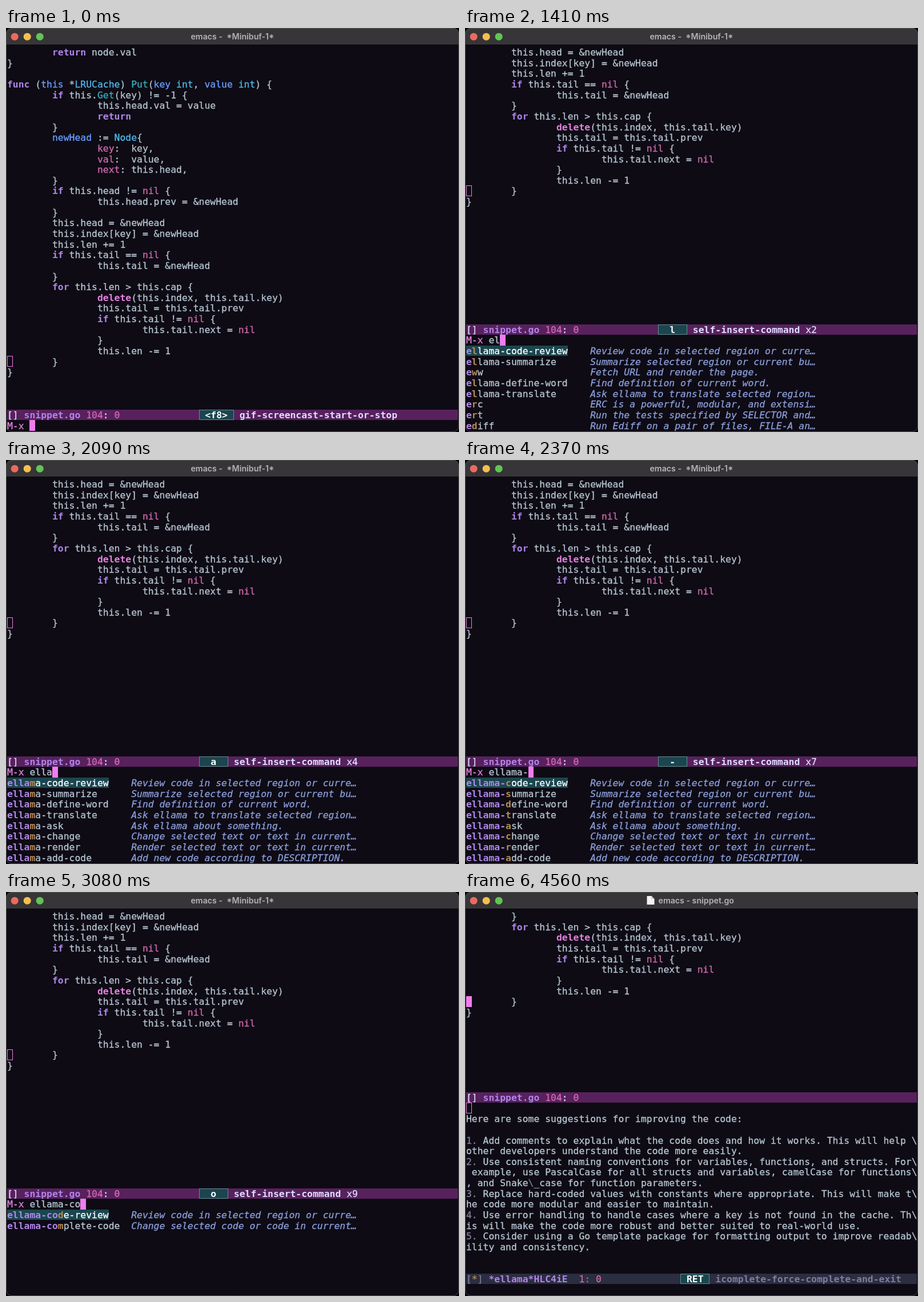
Write an HTML page with a canvas that moves like this. It is 793 by 706 pixels and loops after 8 s.

```html
<!DOCTYPE html>
<html lang="en">
<head>
<meta charset="utf-8">
<title>Code review in emacs</title>
<style>
  html, body { margin: 0; height: 100%; overflow: hidden; background: #000; }
  canvas { display: block; }
</style>
</head>
<body>
<canvas id="stage" width="793" height="706"></canvas>
<script>
const ctx = document.getElementById('stage').getContext('2d');
const LOOP = 8000, CELL = 9.87, LINE = 18.64, LEFT = 2, TOP = 32.9;
const C = {
  bg: '#0e0b14', fg: '#b8c6d5', white: '#ffffff', bar: '#58215d', barFg: '#dedeff',
  idle: '#2b2d40', dim: '#807c9f', teal: '#1b464f', edge: '#668b93', cursor: '#f07cee',
  violet: '#af85ea', pink: '#d369af', orchid: '#e580e0', cyan: '#4fbaef',
  sea: '#35afbf', blue: '#6a9fff', tan: '#b58a52', doc: '#8c9fdc'
};

const CODE = `	return node.val
}

func (this *LRUCache) Put(key int, value int) {
	if this.Get(key) != -1 {
		this.head.val = value
		return
	}
	newHead := Node{
		key:  key,
		val:  value,
		next: this.head,
	}
	if this.head != nil {
		this.head.prev = &newHead
	}
	this.head = &newHead
	this.index[key] = &newHead
	this.len += 1
	if this.tail == nil {
		this.tail = &newHead
	}
	for this.len > this.cap {
		delete(this.index, this.tail.key)
		this.tail = this.tail.prev
		if this.tail != nil {
			this.tail.next = nil
		}
		this.len -= 1
	}
}`.replace(/\t/g, ' '.repeat(8)).split('\n');
const POINT = 29;

// One capture group per entry of TOKEN_STYLES
const TOKEN = /\b(?:(func|return|if|for)|(delete)|(nil|\w+(?=:))|(LRUCache|Node|int)|(Get|Put)|(\w+(?= int| :=)|this(?= \*)))\b/g;
const TOKEN_STYLES = [[C.violet, 'bold'], [C.orchid, 'bold'], [C.pink], [C.cyan], [C.sea], [C.blue]];

const REVIEW = String.raw`Here are some suggestions for improving the code:

1. Add comments to explain what the code does and how it works. This will help \
other developers understand the code more easily.
2. Use consistent naming conventions for variables, functions, and structs. For\
 example, use PascalCase for all structs and variables, camelCase for functions\
, and Snake\_case for function parameters.
3. Replace hard-coded values with constants where appropriate. This will make t\
he code more modular and easier to maintain.
4. Use error handling to handle cases where a key is not found in the cache. Th\
is will make the code more robust and better suited to real-world use.
5. Consider using a Go template package for formatting output to improve readab\
ility and consistency.`.split('\n');

const DOCS = {
  'ellama-code-review': 'Review code in selected region or curre…',
  'ellama-summarize': 'Summarize selected region or current bu…',
  'eww': 'Fetch URL and render the page.',
  'ellama-define-word': 'Find definition of current word.',
  'ellama-translate': 'Ask ellama to translate selected region…',
  'keycast-mode': 'Show current command and its key bindin…',
  'keycast-log-mode': 'Log invoked commands and their key bind…',
  'cd': "Make DIR become the current buffer's de…",
  'erc': 'ERC is a powerful, modular, and extensi…',
  'ert': 'Run the tests specified by SELECTOR and…',
  'ediff': 'Run Ediff on a pair of files, FILE-A an…',
  'ellama-ask': 'Ask ellama about something.',
  'ellama-change': 'Change selected text or text in current…',
  'ellama-render': 'Render selected text or text in current…',
  'ellama-add-code': 'Add new code according to DESCRIPTION.',
  'ellama-change-code': 'Change selected code or code in current…',
  'ellama-complete-code': 'Change selected code or code in current…'
};
const ellama = names => names.split(' ').map(n => 'ellama-' + n);
const recent = ellama('code-review summarize');
const common = ellama('define-word translate');
const LISTS = {
  history: [...recent, 'eww', ...common, 'keycast-mode', 'keycast-log-mode', 'cd'],
  e: [...recent, 'eww', ...common, 'erc', 'ert', 'ediff'],
  ellama: [...recent, ...common, ...ellama('ask change render add-code')],
  c: ellama('code-review change change-code complete-code'),
  co: ellama('code-review complete-code'),
  cod: ellama('code-review')
};

const typing = (at, input, list, matched = input.length) => ({ at, input, list, matched });
const STEPS = [
  { at: 0, input: '' },
  typing(1000, 'e', 'history', 0),
  typing(1410, 'el', 'e', 1),
  typing(1760, 'ell', 'ellama'),
  typing(2090, 'ella', 'ellama'),
  typing(2350, 'ellama', 'ellama'),
  typing(2370, 'ellama-', 'ellama'),
  typing(2670, 'ellama-c', 'c'),
  typing(3080, 'ellama-co', 'co'),
  typing(3150, 'ellama-cod', 'cod'),
  typing(3320, 'ellama-code', 'cod'),
  { ...typing(3510, 'ellama-code', 'cod'), home: true },
  { at: 4560, done: true }
];

const cellX = col => LEFT + col * CELL;
const cellY = row => TOP + row * LINE;

function fill(x, y, w, h, color) {
  const l = Math.round(x), t = Math.round(y);
  ctx.fillStyle = color;
  ctx.fillRect(l, t, Math.round(x + w) - l, Math.round(y + h) - t);
}

// Writes on the character grid and returns the next free column
function put(col, row, text, color = C.fg, style = '') {
  const y = Math.round(cellY(row) + 15.2);
  ctx.font = `${style} 16.4px "DejaVu Sans Mono", monospace`;
  ctx.fillStyle = ctx.strokeStyle = color;
  ctx.lineWidth = 0.3;
  for (const ch of text) {
    if (ch !== ' ') {
      ctx.fillText(ch, cellX(col), y);
      if (style !== 'bold') ctx.strokeText(ch, cellX(col), y);
    }
    col++;
  }
  return col;
}

function cursor(col, row, solid) {
  const x = cellX(col), y = cellY(row);
  fill(x, y, CELL, LINE, C.cursor);
  if (!solid) fill(x + 1, y + 1, CELL - 2, LINE - 2, C.bg);
}

function codeLine(row, line) {
  let col = 0;
  for (const m of line.matchAll(TOKEN)) {
    put(col, row, line.slice(col, m.index));
    const group = m.slice(1).findIndex(Boolean);
    col = put(m.index, row, m[0], ...TOKEN_STYLES[group]);
  }
  put(col, row, line.slice(col));
}

function code(first, solid) {
  cursor(0, POINT - first, solid);
  CODE.slice(first).forEach((line, i) => codeLine(i, line));
}

function modeBar(row, color) {
  fill(LEFT, cellY(row), 789, LINE, color);
}

function fileBar(row) {
  modeBar(row, C.bar);
  put(0, row, '[]', C.barFg);
  put(3, row, 'snippet.go', C.violet, 'bold');
  put(14, row, '104', C.pink);
  put(17, row, ':', C.barFg);
  put(19, row, '0', C.pink);
}

function keyCast(col, row, key, command, color, count = 0) {
  const label = key.length < 3 ? ` ${key} ` : key;
  const w = (label.length + 2) * CELL + 2, x = cellX(col), y = cellY(row);
  fill(x, y, w, LINE, C.edge);
  fill(x + 1, y + 1, w - 2, LINE - 2, C.teal);
  put(col + 1 + 1 / CELL, row, label, C.white, 'bold');
  const end = put(col + w / CELL + 1, row, command, color, 'bold');
  if (count) put(end + 1, row, 'x' + count, color);
}

function candidate(row, name, matched, selected) {
  if (selected) fill(LEFT, cellY(row), name.length * CELL, LINE, C.teal);
  put(0, row, name.slice(0, matched), C.violet, 'bold');
  put(matched, row, name[matched] || '', C.tan, 'bold');
  put(matched + 1, row, name.slice(matched + 1), selected ? C.white : C.fg);
  put(22, row, DOCS[name], C.doc, 'italic');
}

function prompt({ input, list, matched, home }) {
  const bar = list ? 26 : 34, n = input.length;
  code(list ? 16 : 0, false);
  fileBar(bar);
  if (!n) keyCast(34, bar, '<f8>', 'gif-screencast-start-or-stop', C.barFg);
  else if (n === 1) keyCast(34, bar, 'M-x', 'execute-extended-command', C.barFg);
  else keyCast(34, bar, input[n - 1], 'self-insert-command', C.barFg, n);

  cursor(home ? 0 : 4 + n, bar + 1, true);
  put(0, bar + 1, 'M', home ? C.bg : C.orchid);
  put(1, bar + 1, '-x', C.orchid);
  put(4, bar + 1, input);
  (LISTS[list] || []).forEach((name, i) => candidate(bar + 2 + i, name, matched, !i));
}

function review() {
  code(21, true);
  fileBar(17);
  cursor(0, 18, false);
  REVIEW.forEach((line, i) => {
    const number = /^\d\./.test(line) ? 2 : 0, escape = line.indexOf('\\_');
    const row = 19 + i;
    put(0, row, line.slice(0, number), C.dim);
    if (escape < 0) return put(number, row, line.slice(number));
    put(0, row, line.slice(0, escape));
    put(escape, row, '\\', C.dim);
    put(escape + 1, row, line.slice(escape + 1));
  });
  modeBar(34, C.idle);
  put(0, 34, '[ ]', C.dim);
  put(1, 34, '*', C.tan);
  put(4, 34, '*ellama*HLC4iE', C.violet, 'bold');
  put(20, 34, '1', C.pink);
  put(21, 34, ':', C.dim);
  put(23, 34, '0', C.pink);
  keyCast(38, 34, 'RET', 'icomplete-force-complete-and-exit', C.dim);
}

function frame() {
  ctx.fillStyle = '#000';
  ctx.fillRect(0, 0, 793, 706);
  ctx.beginPath();
  ctx.roundRect(0, 0, 793, 706, 10);
  ctx.save();
  ctx.clip();
  fill(0, 0, 793, 706, C.bg);
  fill(0, 0, 793, 29, '#373538');
  fill(0, 29, 793, 1, '#08070a');
  ctx.restore();
  ctx.beginPath();
  ctx.roundRect(0.5, 0.5, 792, 705, 9.5);
  ctx.strokeStyle = '#505052';
  ctx.lineWidth = 1;
  ctx.stroke();
  ['#ec6a5e', '#f4bf4f', '#61c554'].forEach((color, i) => {
    ctx.fillStyle = color;
    ctx.beginPath();
    ctx.arc(15.2 + 22 * i, 15.2, 6.5, 0, 7);
    ctx.fill();
  });
}

function title(done) {
  ctx.font = '600 14.2px Inter, sans-serif';
  ctx.fillStyle = '#b6b4b7';
  if (!done) {
    ctx.textAlign = 'center';
    ctx.fillText('emacs -  *Minibuf-1*', 396.5, 20);
    ctx.textAlign = 'left';
    return;
  }
  ctx.fillText('emacs - snippet.go', 338.5, 20);
  ctx.fillStyle = '#f4f4f4';
  ctx.fill(new Path2D('M318.5 7h8l5 5v10h-13z'));
  ctx.fillStyle = '#c4c4c6';
  ctx.fill(new Path2D('M326.5 7v5h5z'));
}

let shown;
function draw(time) {
  const step = STEPS.findLast(s => s.at <= time % LOOP);
  if (step === shown) return;
  shown = step;
  frame();
  title(step.done);
  step.done ? review() : prompt(step);
}

const start = performance.now();
function tick() {
  draw(performance.now() - start);
  requestAnimationFrame(tick);
}
tick();
</script>
</body>
</html>
```
